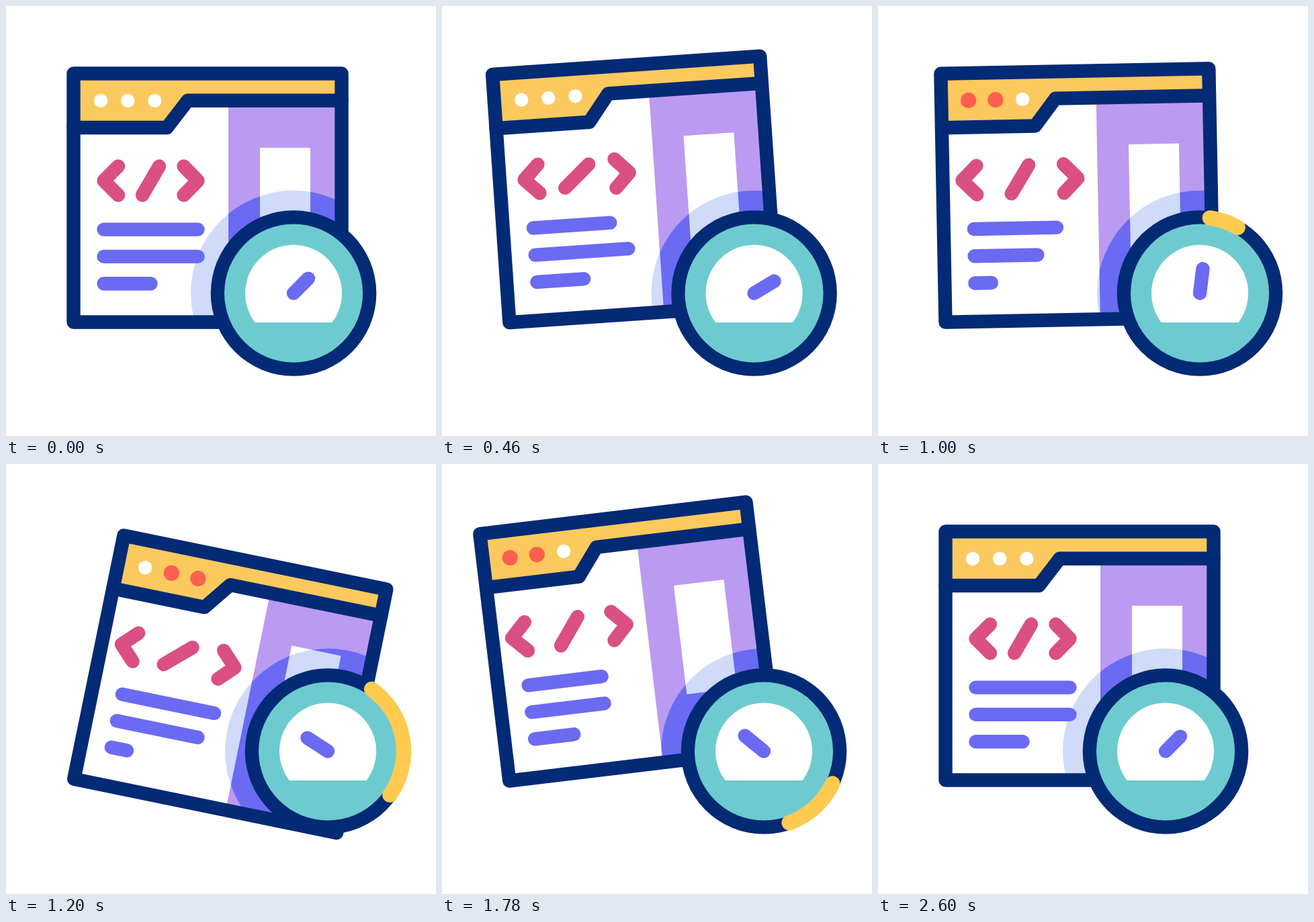
Recreate the animation shown at these times as an HTML page with a canvas. Size 640x640 px, loop 3 s.

```html
<!DOCTYPE html>
<html lang="en">
<head>
<meta charset="utf-8">
<title>Page speed</title>
<style>
html, body { margin: 0; width: 100%; height: 100%; overflow: hidden; background: #fff; }
canvas { display: block; }
</style>
</head>
<body>
<canvas id="stage" width="640" height="640"></canvas>
<script>
const ctx = document.getElementById('stage').getContext('2d');
const LOOP = 3000, START = 220, STAGGER = 200;
const TURN = 2 * Math.PI, RAD = Math.PI / 180, LINE = 20.4;
const NAVY = '#032a75', WHITE = '#fff', PINK = '#da4f84', BLUE = '#6b6af3';
const PIVOT = { x: 109, y: 473 };

// Key poses as [ms, degrees]
const TILT = [[START, 0], [780, -10], [1310, 14], [1810, -7], [2310, 0]];
const NEEDLE = [[START, -45], [690, -18], [800, -18], [1200, -147], [2140, -138], [2560, -45]];

const clamp = v => Math.max(0, Math.min(1, v));
const ease = u => (1 - Math.cos(Math.PI * clamp(u))) / 2;
const ramp = (t, from, to) => ease((t - from) / (to - from));
const wave = u => (1 - Math.cos(TURN * u)) / 2;

// Sum of eased steps from each pose to the next
const pose = (keys, t) => keys.slice(1).reduce((value, [time, next], i) =>
  value + (next - keys[i][1]) * ramp(t, keys[i][0], time), keys[0][1]);

const slide = t => ramp(t, START, 595) - ramp(t, 1800, 2300);
const spread = t => 16 * (ramp(t, START, 690) - ramp(t, 2150, 2560));
const gaugeX = t => 428 + 51 * slide(t);

// Five quick swings of the slash
function slashTurn(t) {
  const u = (t - START) / 410;
  return u > 0 && u < 5 ? 20 * wave(u) : 0;
}

// Each bar shortens twice, less the second time, and later than the bar above
function barLength(i, t) {
  const u = (t - START - i * STAGGER) / 970;
  const depth = u < 0 || u > 2 ? 0 : u < 1 ? 51 : 34;
  return (i < 2 ? 140 : 70) - depth * wave(u);
}

// Each dot turns red twice for half a second, one after the other
function dotRed(i, t) {
  const on = t - 640 - i * STAGGER;
  if (on < 0 || on > 1800) return 0;
  const u = on % 900;
  return clamp(u / 40) * clamp((500 - u) / 40);
}

function trace(points) {
  ctx.beginPath();
  points.forEach(([x, y]) => ctx.lineTo(x, y));
}

function stroke(color) {
  ctx.strokeStyle = color;
  ctx.stroke();
}

function line(color, ...points) {
  trace(points);
  stroke(color);
}

function disc(x, y, r, color) {
  ctx.beginPath();
  ctx.arc(x, y, r, 0, TURN);
  ctx.fillStyle = color;
  ctx.fill();
}

function rect(x, y, w, h, color) {
  ctx.fillStyle = color;
  ctx.fillRect(x, y, w, h);
}

function tiltWindow(t) {
  ctx.translate(PIVOT.x, PIVOT.y);
  ctx.rotate(pose(TILT, t) * RAD);
  ctx.translate(-PIVOT.x, -PIVOT.y);
}

function panelPath() {
  ctx.beginPath();
  ctx.rect(331, 141, 168, 329);
  ctx.rect(378, 211, 75, 163);
}

function pagePath() {
  ctx.beginPath();
  ctx.rect(101, 141, 398, 329);
}

// The halo stays upright with the gauge but only shows inside the tilted shape
function halo(path, color, t) {
  ctx.save();
  tiltWindow(t);
  path();
  ctx.clip('evenodd');
  ctx.resetTransform();
  disc(gaugeX(t), 427.5, 153, color);
  ctx.restore();
}

function drawCode(t) {
  const s = spread(t);
  line(PINK, [167 - s, 238.5], [145.5 - s, 260], [167 - s, 281.5]);
  line(PINK, [264.5 + s, 238.5], [285.5 + s, 260], [264.5 + s, 281.5]);
  ctx.save();
  ctx.translate(215.5, 260);
  ctx.rotate(slashTurn(t) * RAD);
  line(PINK, [12.5, -21.5], [-12.5, 21.5]);
  ctx.restore();
  for (let i = 0; i < 3; i++) {
    const y = 332.6 + i * 40.3;
    line(BLUE, [145.5, y], [145.5 + barLength(i, t), y]);
  }
}

function drawDots(t) {
  for (let i = 0; i < 3; i++) {
    const red = dotRed(i, t);
    disc(141 + i * 40.2, 141, 10.2 + 1.4 * red, `rgb(255,${255 - 160 * red},${255 - 176 * red})`);
  }
}

function drawWindow(t) {
  ctx.save();
  tiltWindow(t);
  rect(100.5, 100.5, 399, 370, WHITE);
  panelPath();
  ctx.fillStyle = '#bb9af2';
  ctx.fill('evenodd');
  ctx.restore();

  halo(pagePath, '#d0dbf9', t);
  halo(panelPath, BLUE, t);

  ctx.save();
  tiltWindow(t);
  const tab = [[100.5, 181], [239.5, 181], [270.5, 140.7], [499.5, 140.7]];
  trace([...tab, [499.5, 100.5], [100.5, 100.5]]);
  ctx.fillStyle = '#fbc95d';
  ctx.fill();
  drawCode(t);
  line(NAVY, ...tab);
  ctx.beginPath();
  ctx.rect(100.5, 100.5, 399, 370);
  stroke(NAVY);
  drawDots(t);
  ctx.restore();
}

function drawGauge(t) {
  ctx.save();
  ctx.translate(gaugeX(t), 427.5);
  disc(0, 0, 123.3, NAVY);
  disc(0, 0, 103, '#6dcbd0');

  const cut = Math.asin(43.5 / 72);
  ctx.beginPath();
  ctx.arc(0, 0, 72, Math.PI - cut, cut);
  ctx.fillStyle = WHITE;
  ctx.fill();

  const angle = pose(NEEDLE, t) * RAD, length = 31 + 5.5 * slide(t);
  line(BLUE, [0, 0], [Math.cos(angle) * length, Math.sin(angle) * length]);

  // The arc shoots out, then its tail catches up at a steady pace
  const head = 160.5 * ramp(t, 860, 1355) - 90;
  const tail = Math.max(0, (t - 946) * 0.138) - 90;
  if (head > tail) {
    ctx.beginPath();
    ctx.arc(0, 0, 113, tail * RAD, head * RAD);
    ctx.lineWidth = 22.6;
    stroke('#fecb50');
  }
  ctx.restore();
}

function draw(t) {
  ctx.resetTransform();
  rect(0, 0, 640, 640, WHITE);
  ctx.lineWidth = LINE;
  ctx.lineCap = ctx.lineJoin = 'round';
  drawWindow(t);
  drawGauge(t);
}

const began = performance.now();
function tick() {
  draw((performance.now() - began) % LOOP);
  requestAnimationFrame(tick);
}
tick();
</script>
</body>
</html>
```
